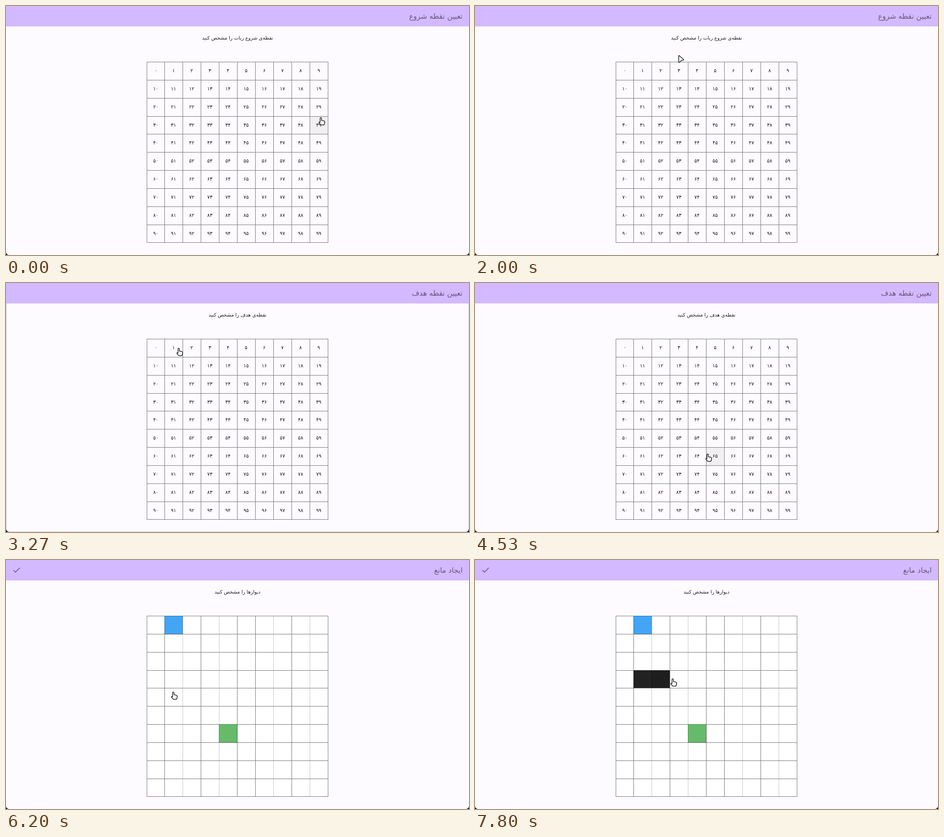
Write an HTML page with a canvas that moves like this. It is 1020 px wide and 549 px high and loops after 8000 ms.

```html
<!DOCTYPE html>
<html lang="fa">
<head>
<meta charset="utf-8">
<style>
html, body { margin: 0; width: 100%; height: 100%; overflow: hidden; background: #fdfbff; }
canvas { display: block; }
</style>
</head>
<body>
<canvas id="stage" width="1020" height="549"></canvas>
<script>
const ctx = document.getElementById('stage').getContext('2d');
const LOOP = 8000, FPS = 15;
const FONT = '"DejaVu Sans", sans-serif';

const pages = [
  { from: 0, title: 'تعیین نقطه شروع', hint: 'نقطه\u200cی شروع ربات را مشخص کنید' },
  { from: 48, title: 'تعیین نقطه هدف', hint: 'نقطه\u200cی هدف را مشخص کنید' },
  { from: 81, title: 'ایجاد مانع', hint: 'دیوارها را مشخص کنید', walls: true }
];

// Pointer path: [tick, x, y], 15 ticks per second
const path = [
  [0, 696, 254], [8, 696, 254], [9, 753, 314], [17, 753, 314], [20, 783, 268],
  [24, 722, 150], [27, 590, 100], [30, 454, 117], [33, 418, 132], [36, 383, 152],
  [56, 383, 152], [60, 415, 215], [65, 500, 360], [68, 515, 385], [69, 515, 385],
  [73, 500, 398], [86, 500, 398], [90, 415, 330], [93, 371, 299], [96, 368, 288],
  [99, 372, 279], [104, 372, 279], [107, 403, 279], [109, 403, 279], [117, 438, 270], [120, 438, 270]
];

const hand = new Path2D('M-4 2V-6.6a1.5 1.5 0 0 1 3 0V-2L4-.9Q6.6-.2 6.3 2.5L5.5 6Q5 8.3 2.5 8.3H-1Q-2.5 8.3-3.5 7L-6.6 3Q-6.2 .9-4 2.6Z');
const arrow = new Path2D('M-5.2-7.2Q-5.2-8.4-4.2-7.6L5.6 1Q6.4 2 5.2 2.3L0 3.8L-3.8 7.4Q-5.2 8.2-5.2 6.8Z');

const colX = i => Math.floor(310 + 39.95 * i);
const rowY = i => Math.floor(123.46 + 39.85 * i);
const persian = n => String(n).replace(/\d/g, d => String.fromCharCode(0x6f0 + +d));

function pointerAt(tick) {
  const k = Math.max(1, path.findIndex(p => p[0] >= tick));
  const [t0, x0, y0] = path[k - 1], [t1, x1, y1] = path[k];
  const f = (tick - t0) / (t1 - t0);
  return { x: x0 + (x1 - x0) * f, y: y0 + (y1 - y0) * f };
}

function cellAt(x, y) {
  const c = Math.floor((x - 310) / 39.95), r = Math.floor((y - 123.46) / 39.85);
  return c >= 0 && c < 10 && r >= 0 && r < 10 ? r * 10 + c : -1;
}

function box(x, y, w, h, color) {
  ctx.fillStyle = color;
  ctx.fillRect(x, y, w, h);
}

function fillCell(cell, color) {
  const c = cell % 10, r = Math.floor(cell / 10);
  box(colX(c), rowY(r), colX(c + 1) - colX(c), rowY(r + 1) - rowY(r), color);
}

function text(str, x, y, size, color, align) {
  ctx.font = size + 'px ' + FONT;
  ctx.fillStyle = color;
  ctx.textAlign = align;
  ctx.fillText(str, x, y);
}

function drawRipple(cell, x, y) {
  const c = cell % 10, r = Math.floor(cell / 10);
  ctx.save();
  ctx.beginPath();
  ctx.rect(colX(c), rowY(r), 40, 40);
  ctx.clip();
  ctx.beginPath();
  ctx.arc(x, y, 10, 0, 7);
  ctx.fillStyle = 'rgba(0,0,0,.08)';
  ctx.fill();
  ctx.restore();
}

function drawGrid(walls, settled) {
  for (let i = 0; i <= 10; i++) {
    const light = walls && settled && [2, 4, 7, 9].includes(i);
    box(colX(i), 123, 1, 399, light ? '#c4c4c4' : '#747474');
  }
  for (let i = 0; i <= 10; i++) box(310, rowY(i), 400, 1, '#747474');
}

function drawPage(page, tick, tip, hover) {
  const scale = [.998, .9995][tick - page.from] || 1;
  const zoom = page.from ? scale : 1;
  ctx.save();
  ctx.translate(510, 274.5);
  ctx.scale(zoom, zoom);
  ctx.translate(-510, -274.5);

  ctx.beginPath();
  ctx.roundRect(0, 0, 1020, 549, [0, 0, 7, 7]);
  ctx.fillStyle = '#fdfbff';
  ctx.fill();
  box(0, 0, 1020, 45, '#d3b9ff');
  ctx.direction = 'rtl';
  text(page.title, 1006, 28, 16, '#645879', 'right');
  text(page.hint, 510, 74, 10.7, '#1c1b1f', 'center');
  ctx.direction = 'ltr';

  if (page.walls) {
    box(310, 123, 400, 399, '#fff');
    ctx.strokeStyle = '#645879';
    ctx.lineWidth = 1.6;
    ctx.stroke(new Path2D('M16.5 22.5L20.8 26.8L30.3 17.3'));
  } else {
    const rested = page.from && tick < 57;
    if (hover >= 0 && !rested) fillCell(hover, '#f1eff2');
    if ((tick >= 43 && tick < 48) || tick >= 78) drawRipple(hover, tip.x, tip.y);
  }

  drawGrid(page.walls, zoom === 1);

  if (page.walls) {
    fillCell(1, '#42a5f5');
    fillCell(64, '#66bb6a');
    if (tick >= 104) fillCell(31, '#222');
    if (tick >= 110) {
      fillCell(32, '#1e1e1e');
      box(colX(2), 243, 1, 39, '#101010');
    }
    ctx.lineWidth = 1;
    ctx.strokeStyle = 'rgba(0,0,0,.3)';
    for (const [x, y] of [[1, 0], [4, 6]])
      ctx.strokeRect(colX(x) + .5, rowY(y) + .5, 40, 40);
  } else {
    for (let n = 0; n < 100; n++)
      text(persian(n), colX(n % 10) + 20, rowY(Math.floor(n / 10)) + 23, 10.7, '#1c1b1f', 'center');
  }
  ctx.restore();
}

function drawPointer(p, shape) {
  ctx.save();
  ctx.translate(p.x, p.y);
  ctx.lineJoin = 'round';
  ctx.lineWidth = 1.5;
  ctx.fillStyle = '#fff';
  ctx.strokeStyle = '#222';
  ctx.fill(shape);
  ctx.stroke(shape);
  ctx.restore();
}

function frame(now) {
  const tick = Math.floor((now % LOOP) * FPS / 1000 + .06);
  const p = pointerAt(tick);
  const tip = { x: p.x - 2, y: p.y - 8 };
  const hover = cellAt(tip.x, tip.y);
  box(0, 0, 1020, 549, '#151515');
  drawPage(pages.findLast(page => tick >= page.from), tick, tip, hover);
  drawPointer(p, hover >= 0 ? hand : arrow);
  requestAnimationFrame(frame);
}
requestAnimationFrame(frame);
</script>
</body>
</html>
```
